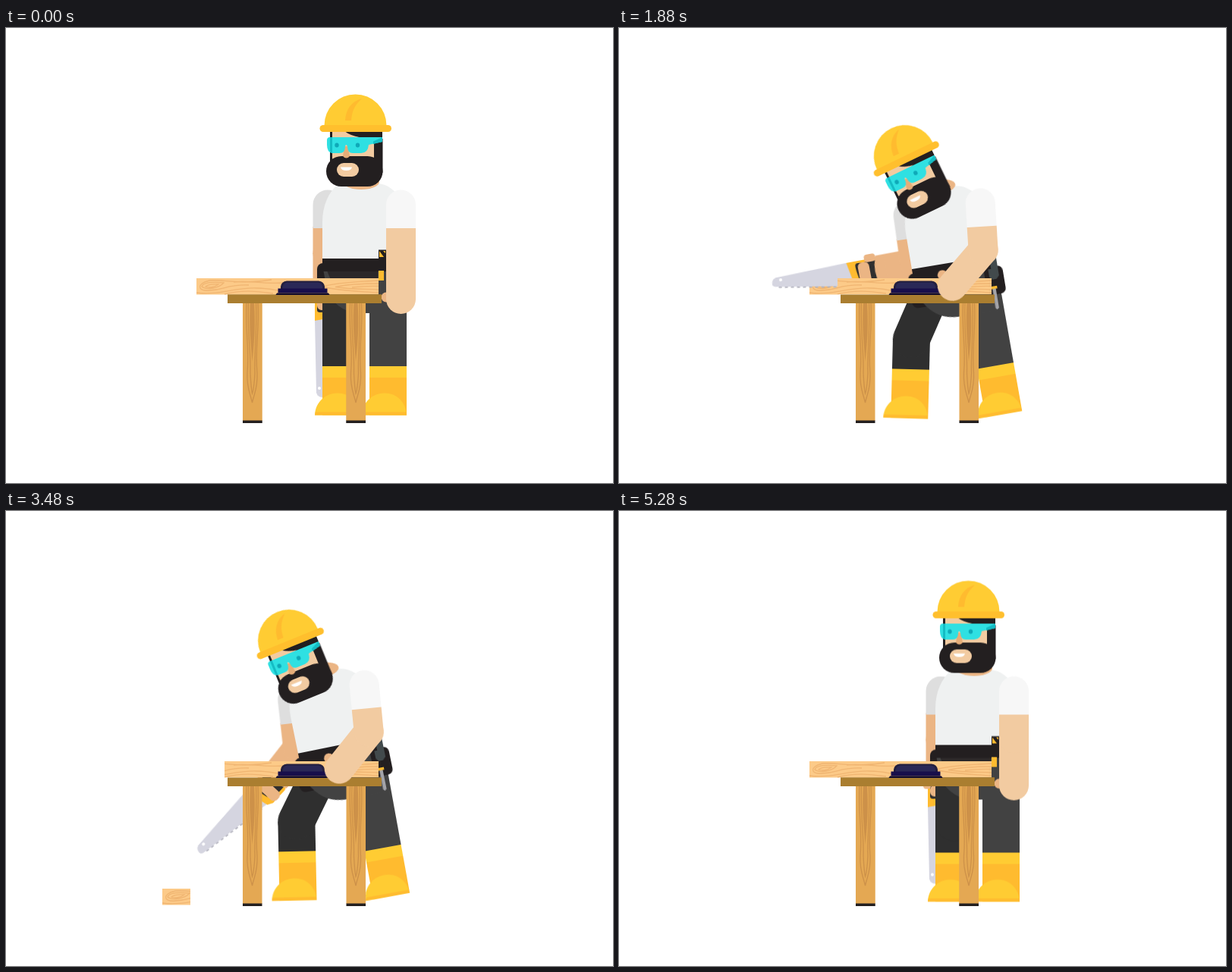
These frames come from a looping animation (800x600 px, 6 s). An HTML page without scripts:

```html
<!DOCTYPE html>
<html lang="en">
<head>
<meta charset="utf-8">
<title>Carpenter</title>
<style>
html, body { margin: 0; width: 100%; height: 100%; overflow: hidden; background: #fff; }
svg { display: block; width: 100vw; height: 100vh; }
.a { animation: 6s ease-in-out infinite; }

/* joints */
.torso { transform-origin: 459px 340px; animation-name: torso; }
.head  { transform-origin: 459px 200px; animation-name: head; }
.thigh { transform-origin: 441.5px 340px; animation-name: thigh; }
.shin  { transform-origin: 441.5px 406px; animation-name: shin; }
.leg   { transform-origin: 503.5px 340px; animation-name: leg; }
.arm   { transform-origin: 424px 233px; animation-name: arm; }
.fore  { transform-origin: 424px 297px; animation-name: fore; }
.saw   { transform-origin: 425px 360px; animation-name: saw; }
.near  { transform-origin: 520.5px 233px; animation-name: near; }
.grip  { transform-origin: 520.5px 295px; animation-name: grip; }
.chip  { transform-origin: 288px 330px; animation-name: chip; }
.fresh { animation-name: fresh; }
.cover { animation-name: cover; animation-timing-function: step-end; }

@keyframes torso {
  0% { transform: none; }
  10.67%, 44.33% { transform: translate(-25.7px, 6.6px) rotate(-9.5deg); }
  50.67% { transform: translate(-25.7px, 6.6px) rotate(-8.5deg); }
  58%, 59% { transform: translate(-25.7px, 6.6px) rotate(-11.5deg); }
  74%, 76.3% { transform: translate(-61px, 4.5px); }
  88%, 100% { transform: translate(0, 4.5px); }
}
@keyframes head {
  0% { transform: none; }
  10.67%, 16.67% { transform: translate(-57.4px, 37.4px) rotate(-33.5deg); }
  24.67% { transform: translate(-54px, 34px) rotate(-23deg); }
  31.33% { transform: translate(-52.4px, 34.1px) rotate(-25.8deg); }
  37.67% { transform: translate(-54.5px, 34.5px) rotate(-22.5deg); }
  44.33% { transform: translate(-53px, 34.4px) rotate(-25.8deg); }
  50.67% { transform: translate(-55px, 35px) rotate(-22.5deg); }
  58%, 59% { transform: translate(-60.3px, 37.8px) rotate(-22.2deg); }
  74%, 76.3% { transform: translate(-61px, 4.5px); }
  88%, 100% { transform: translate(0, 4.5px); }
}
@keyframes thigh {
  0% { transform: none; }
  10.67%, 50.67% { transform: translate(-29.7px, 9.5px) rotate(23.5deg); }
  58%, 59% { transform: translate(-29.7px, 9.5px) rotate(26deg); }
  74%, 76.3% { transform: translate(-61px, 4.5px) rotate(.4deg); }
  82% { transform: translate(-30px, 4.5px) rotate(7deg); }
  88%, 100% { transform: translate(0, 4.5px); }
}
@keyframes shin {
  0% { transform: none; }
  10.67%, 50.67% { transform: rotate(-22deg); }
  58%, 59% { transform: rotate(-27.2deg); }
  74%, 100% { transform: none; }
}
@keyframes leg {
  0% { transform: none; }
  10.67%, 50.67% { transform: translate(-26px, 1px) rotate(-10deg); }
  58%, 59% { transform: translate(-26px, 0) rotate(-10.3deg); }
  74%, 76.3% { transform: translate(-61px, 4.5px) rotate(-6.2deg); }
  82% { transform: translate(-30px, 4.5px) rotate(-7deg); }
  88%, 100% { transform: translate(0, 4.5px); }
}
@keyframes arm {
  0% { transform: none; }
  10.67% { transform: rotate(-12.5deg); }
  13.33%, 16.67% { transform: rotate(-10.5deg); }
  24.67% { transform: rotate(-62deg); }
  31.33% { transform: rotate(1.5deg); }
  37.67% { transform: rotate(-63.5deg); }
  44.33% { transform: rotate(4.5deg); }
  50.67% { transform: rotate(-65.5deg); }
  58%, 59% { transform: rotate(5.1deg); }
  74%, 100% { transform: none; }
}
@keyframes fore {
  0% { transform: none; }
  10.67% { transform: rotate(110.5deg); }
  13.33%, 16.67% { transform: rotate(108.5deg); }
  24.67% { transform: rotate(137deg); }
  31.33% { transform: rotate(87.4deg); }
  37.67% { transform: rotate(136deg); }
  44.33% { transform: rotate(82.5deg); }
  50.67% { transform: rotate(135deg); }
  58%, 59% { transform: rotate(44.4deg); }
  74%, 100% { transform: none; }
}
@keyframes saw {
  0%, 50.67% { transform: none; }
  58%, 59% { transform: rotate(4.5deg); }
  74%, 100% { transform: none; }
}
@keyframes near {
  0%, 74%, 100% { transform: none; }
  10.67%, 59% { transform: rotate(6deg); }
}
@keyframes grip {
  0%, 74%, 100% { transform: none; }
  10.67%, 59% { transform: rotate(44deg); }
}
@keyframes chip {
  0%, 50% { transform: none; opacity: 1; }
  50.67% { transform: translate(0, .5px) rotate(-7deg); animation-timing-function: ease-in; }
  53.5% { transform: translate(-22px, 75px) rotate(-22deg); animation-timing-function: linear; }
  56%, 76.6% { transform: translate(-45px, 168px); opacity: 1; }
  83%, 100% { transform: translate(-45px, 168px); opacity: 0; }
}
@keyframes fresh {
  0%, 76.6% { opacity: 0; }
  83%, 100% { opacity: 1; }
}
@keyframes cover {
  0% { opacity: 1; }
  5% { opacity: 0; }
  65%, 100% { opacity: 1; }
}
</style>
</head>
<body>
<svg viewBox="0 0 800 600">
  <defs>
    <clipPath id="end"><path d="M251 330h37v21.5h-37z"/></clipPath>
    <clipPath id="rest"><path d="M288 330h203v21.5h-203z"/></clipPath>
    <g id="plank">
      <path fill="#fcca88" d="M251 330h240v21.5H251z"/>
      <g fill="none" stroke="#f0b572" stroke-width="1.3">
        <path d="M350 332C310 339 285 331 268 333C250 337 253 348 268 346C290 345 290 338 320 339"/>
        <path d="M258 341C260 335 275 335 287 336C281 343 264 346 258 341zM263 341C268 337 274 338 280 338C275 342 267 343 263 341z"/>
        <path d="M251 349C280 353 300 342 330 343S350 347 365 346M288 351C310 345 330 347 352 350M300 335C320 332 335 338 365 336"/>
        <path d="M491 333C465 335 440 335 416 341C440 347 465 347 491 349M491 337C470 337 450 338 434 341.5C455 345 470 344 491 345M491 340.5C475 340 465 341 456 342"/>
      </g>
    </g>
    <g id="post">
      <path fill="#e4a853" d="M312 363h25.5v155H312z"/>
      <path fill="none" stroke="#cd9149" stroke-width="1.3" d="M317 363C315 400 321 420 318 455C317 475 322 482 324.5 494C327 482 332 475 331 455C328 420 334 400 332 363M319.500 363C318 400 323 430 322 455Q323 475 324.500 482Q327 475 328 455C327 430 331 400 329.500 363"/>
      <path fill="#cd9149" d="M322 363C320 395 323 415 324.5 440C327 415 329 395 327 363z"/>
      <path fill="#231f20" d="M312 517.500h25.500v3.500H312z"/>
    </g>
    <g id="boot">
      <path fill="#ffbb2f" d="M417 446h49v64.500h-49z"/>
      <path fill="#ffcc33" d="M417 446h49v15h-49zM407 510.500C408 493 421 481.500 437 481.500S465 493 466 510.500z"/>
      <path fill="#ffbb2f" d="M408 506.500h58v4h-59z"/>
    </g>
  </defs>

  <use href="#plank" clip-path="url(#end)" class="a fresh"/>
  <g class="a chip"><use href="#plank" clip-path="url(#end)"/></g>

  <!-- far arm with saw -->
  <g class="a torso"><g class="a arm">
    <g class="a fore">
      <path stroke="#ebb584" stroke-width="39" d="M424 297v50"/>
      <g class="a saw"><g transform="translate(425 360) rotate(-90)">
        <path fill="none" stroke="#b3b3be" stroke-width="4" stroke-dasharray="4 4" d="M-119 -4L-25 13"/>
        <path fill="#d5d5e0" d="M-24 -18L-121 -16Q-127 -14 -127 -8Q-127 -5 -122 -4L-20 14z"/>
        <circle cx="-115" cy="-12" r="2" fill="#fff"/>
        <path fill="#ffbb2f" d="M-26 -18H14V15Q13 19 9 19H-13L-20 15z"/>
        <path fill="#2f2f2f" d="M-12 -15H11Q14 -15 12 -9Q8 0 13 12Q14 15 11 15H-7Q-11 15 -13 5T-15 -11Q-15 -15 -12 -15z"/>
        <path fill="#ebb584" d="M13 -19H24V19H13Q6 0 13 -19z"/>
        <rect fill="#ebb584" x="-12" y="-15" width="15" height="35" rx="6"/>
        <rect fill="#ebb584" x="-2" y="-24" width="15" height="10" rx="4"/>
      </g></g>
    </g>
    <path stroke="#ebb584" stroke-width="39" d="M424 262v36"/>
    <circle cx="424" cy="297" r="19.500" fill="#ebb584"/>
    <path fill="#dedede" d="M404.500 264V233a19.500 19.500 0 0 1 39 0v31z"/>
  </g></g>

  <g class="a thigh">
    <g class="a shin">
      <path fill="#2f2f2f" d="M417 406h49v41h-49z"/>
      <use href="#boot"/>
    </g>
    <path fill="#2f2f2f" d="M417 340h49v66a24.500 24.500 0 0 1-49 0z"/>
  </g>
  <g class="a leg">
    <path fill="#424242" d="M479 340h49v107h-49z"/>
    <use href="#boot" x="62"/>
  </g>

  <g class="a torso">
    <rect x="410" y="310" width="26" height="46" rx="8" fill="#231f20"/>
    <path fill="#424242" d="M418 318H524V376H468Q440 376 424 350z"/>
    <path fill="#2b2829" d="M423 320h67v12h-62z"/>
    <rect x="510" y="318" width="25" height="37" rx="7" fill="#231f20"/>
    <path fill="#424a4c" d="M516 306h13v25l-4 4h-6l-3-4z"/>
    <path fill="#a3a3a8" d="M517.500 347h4.500v26l-2.500 2-2-2z"/>
    <path fill="#ffbb2f" d="M513 344h11v3.500h-11z"/>
    <path fill="#eff1f1" d="M417 305V256C417 234 425 217 438 205H490C503 206 514 214 520 228V305z"/>
    <ellipse cx="468" cy="203" rx="24" ry="10" fill="#ebb584"/>
    <path fill="#231f20" d="M491 292.500h10v12h-10zM417 304h103v17H417z"/>
    <path fill="#ffbb2f" d="M492 294l6 8h-6zM497 294h3v3zM491 320h7v13h-7z"/>
    <path fill="#424242" d="M491 333h10v16h-10z"/>
  </g>

  <g class="a head">
    <path fill="#231f20" d="M427 132h69v60h-69z"/>
    <path fill="#f2cba1" d="M430 132h16Q458 146 485 146V180H430z"/>
    <rect x="422" y="169" width="74.500" height="40" rx="20" fill="#231f20"/>
    <path fill="#231f20" d="M485 146h11.500v45H485z"/>
    <path fill="#e6ad78" d="M446 156h4.500l2.500 13q-4.500 5-9 0z"/>
    <path fill="#2fe0e2" d="M427 144H496V150L478 154Q477 165 468 165H457Q450 165 450 156Q448 152 447 156Q447 165 440 165H430Q423 164 423 154V148Q423 144 427 144z"/>
    <path fill="#14bcc4" d="M427 144h3v20.500q-3 0-3-2zM484 149.500l12-5.500v6l-12 3z"/>
    <g fill="#0fa9b8"><ellipse cx="436" cy="154.500" rx="2.700" ry="3"/><ellipse cx="463.500" cy="154.500" rx="2.700" ry="3"/></g>
    <path fill="#231f20" d="M446 136H496V144H466Q454 142 446 136z"/>
    <rect x="436" y="178" width="29" height="18" rx="9" fill="#f2cba1"/>
    <path fill="#fff" d="M441 183.500h15q-1 4.500-7.500 4.500t-7.500-4.500z"/>
    <path fill="#ffcc33" d="M419.500 130v-1.500a41 41 0 0 1 82 0v1.500z"/>
    <path fill="#ffbb2f" d="M447 122C448 107 455 97 469 93C458 103 456 111 455 122z"/>
    <rect x="413.500" y="128" width="94.500" height="9" rx="4.500" fill="#ffbf2d"/>
  </g>

  <g class="a torso"><g class="a near"><g class="a grip">
    <circle cx="501" cy="355" r="6.500" fill="#ebb584"/>
  </g></g></g>

  <g id="table">
    <use href="#post"/>
    <use href="#post" x="136.500"/>
    <use href="#plank" clip-path="url(#rest)"/>
    <path fill="#aa7e30" d="M292 351.500h203V363H292z"/>
    <path fill="#231f3f" d="M362 345v-4q1-7 8-7.500h42q7 .5 8 7.500v4z"/>
    <path fill="#2a2857" d="M365 344v-3q1-5 6-5.500h40q5 .5 6 5.500v3z"/>
    <path fill="#180f4b" d="M358.500 343.500h65v6h-65z"/>
    <path fill="#0f0a2c" d="M357 349.500h68l1.500 2.500H355.500z"/>
  </g>

  <g class="a torso"><g class="a near">
    <g fill="none" stroke="#f2cba1" stroke-width="39" stroke-linecap="round">
      <path class="a grip" d="M520.500 295v62.500"/>
      <path d="M520.500 250v45"/>
    </g>
    <path fill="#f7f7f7" d="M501 264V233a19.500 19.500 0 0 1 39 0v31z"/>
  </g></g>

  <use href="#table" class="a cover"/>
</svg>
</body>
</html>
```
